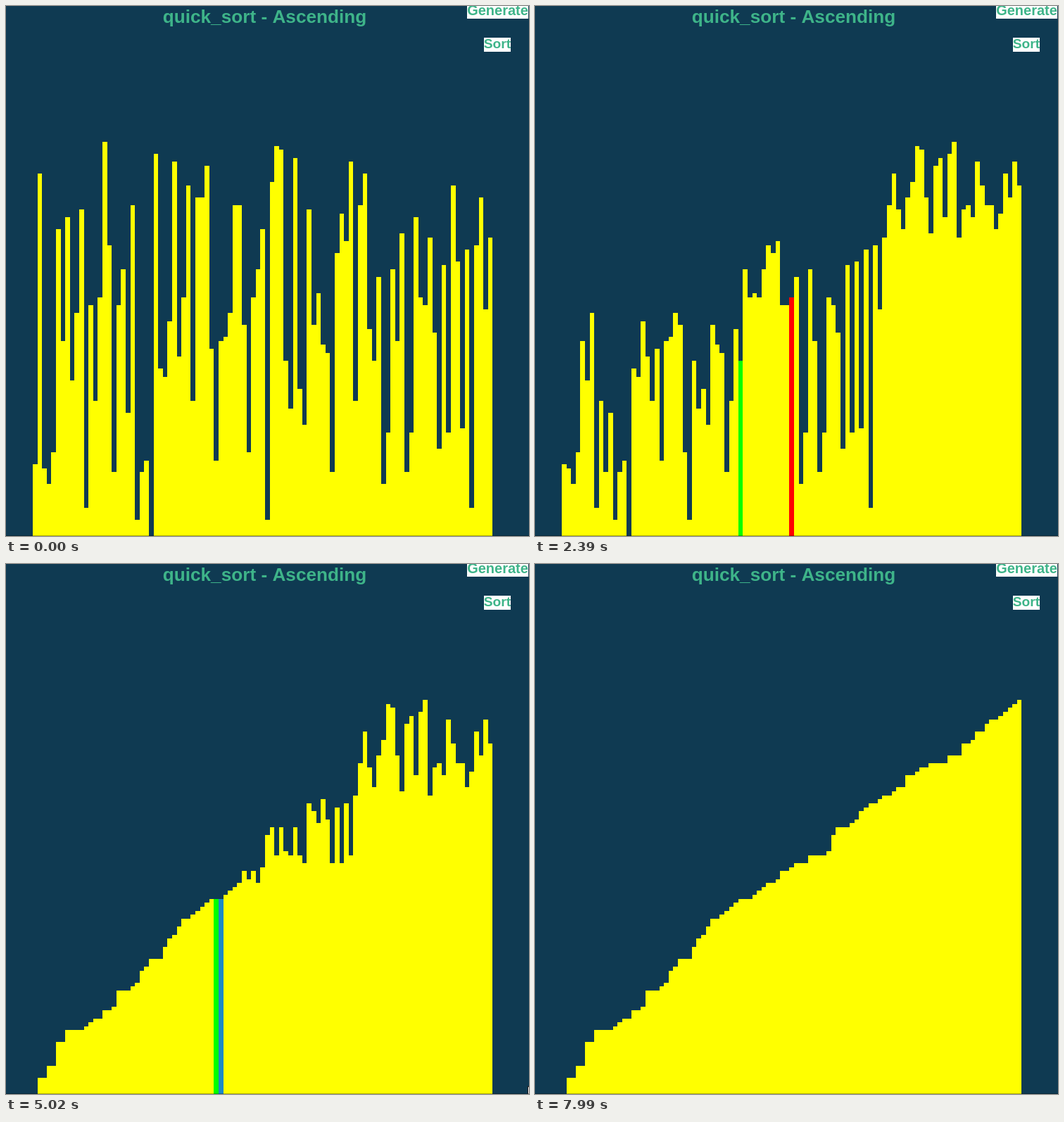
An HTML page with a canvas for the animation above (8.06 s loop, 743 px wide and 753 px high).

```html
<!DOCTYPE html>
<html lang="en">
<head>
<meta charset="utf-8">
<title>Quick sort</title>
<style>
  html, body { margin: 0; width: 100%; height: 100%; overflow: hidden; background: #0f3a52; }
  canvas { display: block; }
</style>
</head>
<body>
<canvas id="stage" width="743" height="753"></canvas>
<script>
const ctx = document.getElementById('stage').getContext('2d');
const WIDTH = 743, HEIGHT = 753, LOOP = 8060;
const LEFT = 38, BAR = 6.6, UNIT = 5.657;
const BACKGROUND = '#0f3a52', YELLOW = '#ffff00', MINT = '#3eb489';
const GREEN = '#00ff00', RED = '#ff0000', BLUE = '#1e88c8';

const values = [
  18, 91, 17, 13, 21, 77, 49, 80, 39, 56, 82, 7, 58, 34, 60, 99, 73, 16, 58, 67,
  31, 83, 4, 16, 19, 0, 96, 42, 40, 54, 94, 45, 60, 88, 34, 85, 85, 93, 47, 19,
  49, 50, 56, 83, 83, 53, 21, 60, 67, 77, 4, 89, 98, 97, 44, 32, 95, 37, 28, 82,
  53, 61, 48, 46, 16, 71, 81, 74, 94, 34, 83, 91, 52, 44, 65, 13, 26, 67, 49, 76,
  16, 26, 80, 60, 58, 75, 51, 22, 68, 26, 88, 69, 27, 72, 7, 73, 85, 57, 75];

// Record every step of the sort: the bars and which of them are highlighted.
const steps = [{ bars: [...values], colors: {} }];

function quickSort(list, low, high) {
  if (low >= high) return;
  const swap = (a, b, color) => {
    [list[a], list[b]] = [list[b], list[a]];
    steps.push({ bars: [...list], colors: { [a]: GREEN, [b]: color } });
  };
  let split = low;
  for (let j = low; j < high; j++) {
    if (list[j] < list[high]) swap(split++, j, RED);
  }
  swap(split, high, BLUE);
  steps.push(steps[steps.length - 1]); // the pivot step is held twice as long
  quickSort(list, low, split - 1);
  quickSort(list, split + 1, high);
}

const sorted = [...values];
quickSort(sorted, 0, sorted.length - 1);
steps.push({ bars: sorted, colors: {} });

// Pace of the sort as [time, step]; the picture refreshes about every 69 ms.
const pace = [
  [0, -28], [450, -2], [870, 22], [1150, 38], [1770, 74], [2390, 110], [3370, 167],
  [3720, 187], [4210, 215], [5020, 263], [5080, 267], [5910, 316], [6550, 352],
  [6760, 364], [7390, 400], [LOOP, 440]];
const REFRESH = 69;

function sample(time) {
  const k = pace.findIndex(([end]) => end > time);
  const [t0, n0] = pace[k - 1], [t1, n1] = pace[k];
  const ticks = Math.round((t1 - t0) / REFRESH);
  const p = Math.floor((time - t0) / (t1 - t0) * ticks + 1e-6) / ticks;
  const step = Math.round(n0 + (n1 - n0) * p);
  return {
    held: t0 + (t1 - t0) * p,
    step: steps[Math.min(Math.max(step, 0), steps.length - 1)]
  };
}

function box(x, y, w, h, color) {
  ctx.fillStyle = color;
  ctx.fillRect(x, y, w, h);
}

function label(text, x, y, size) {
  ctx.font = `bold ${size}px "Liberation Sans", Arial, sans-serif`;
  ctx.textAlign = 'center';
  ctx.fillStyle = MINT;
  ctx.fillText(text, x, y);
}

function drawBars({ bars, colors }) {
  bars.forEach((value, i) => {
    const x = Math.round(LEFT + BAR * i);
    const next = Math.round(LEFT + BAR * (i + 1));
    const y = Math.round(HEIGHT - UNIT * value);
    box(x, y, next - x, HEIGHT - y, colors[i] || YELLOW);
  });
}

function drawPointer(x, y) {
  const arrow = new Path2D('M0.5 0.5V13L3.3 10.4L5.3 15.3L7.2 14.5L5.2 9.8H9Z');
  ctx.save();
  ctx.translate(x, y);
  ctx.fillStyle = '#fff';
  ctx.strokeStyle = '#222';
  ctx.lineWidth = 1;
  ctx.fill(arrow);
  ctx.stroke(arrow);
  ctx.restore();
}

function movePointer(t) {
  const glide = (from, to, start, end) => from + (to - from) * (t - start) / (end - start);
  if (t >= 70 && t < 1150) drawPointer(glide(741, 668, 70, 1150), glide(741, 698, 70, 1150));
  else if (t >= 1150 && t < 1600) drawPointer(glide(668, 660, 1150, 1600), glide(698, 756, 1150, 1600));
  else if (t >= 3000 && t < 7990) drawPointer(741, 741);
}

function render(time) {
  const { held, step } = sample(time);
  box(0, 0, WIDTH, HEIGHT, BACKGROUND);
  label('quick_sort - Ascending', 367.5, 24, 26.2);
  box(655, 0, 87, 18, '#fff');
  label('Generate', 698.5, 13, 20);
  box(679, 45, 38, 20, '#fff');
  label('Sort', 698, 60, 19.2);
  drawBars(step);
  box(0, HEIGHT - 1, WIDTH, 1, 'rgba(0, 0, 0, 0.3)');
  movePointer(time >= 7990 ? time : held);
}

function loop() {
  render(performance.now() % LOOP);
  requestAnimationFrame(loop);
}
loop();
</script>
</body>
</html>
```
